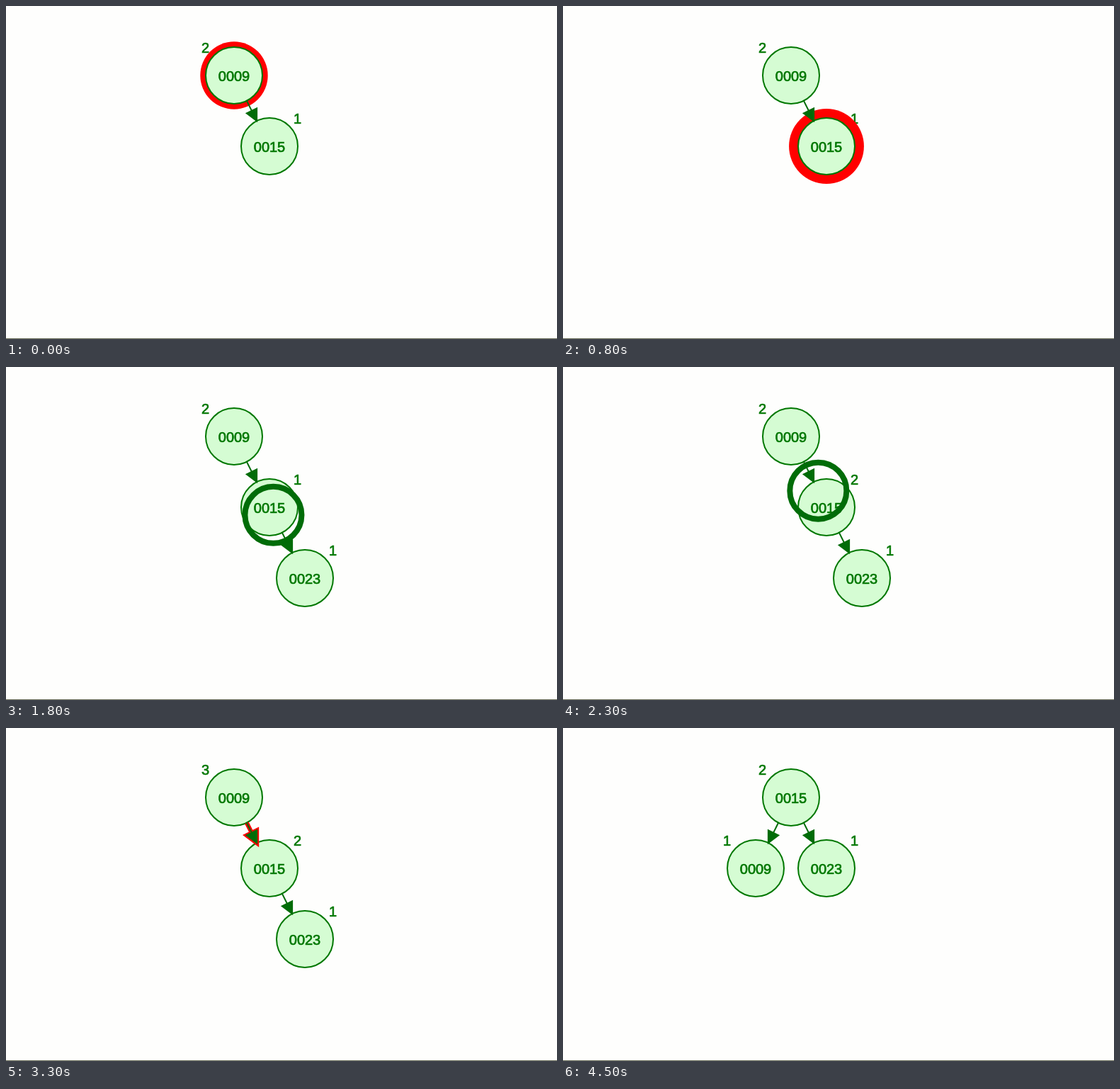
Recreate the animation shown at these times as an HTML page with a canvas. Size 778 by 470 pixels, loop 5000 ms.

```html
<!DOCTYPE html>
<html lang="en">
<head>
<meta charset="utf-8">
<title>Balanced tree insertion</title>
<style>
  html, body { margin: 0; width: 100%; height: 100%; overflow: hidden; background: #fefefd; }
  canvas { display: block; filter: blur(0.7px); }
  #rule { position: absolute; left: 0; top: 469px; width: 778px; height: 1px; background: #666a55; }
</style>
</head>
<body>
<canvas id="stage" width="778" height="470"></canvas>
<div id="rule"></div>
<script>
const ctx = document.getElementById('stage').getContext('2d');
const LOOP = 5000, TICK = 100;
const BLOCK = 372.5, FIRST = -22;   // every algorithm step lasts one block
const R = 40;
const PAPER = '#fefefd', FILL = '#d5fcd3', INK = '#007700', LINK = '#006c08', RED = '#ff0000';

const at = (x, y) => ({ x, y });
const mix = (a, b, p) => at(a.x + (b.x - a.x) * p, a.y + (b.y - a.y) * p);

// Resting places of nodes and of their height labels
const ROOT = at(322, 98), LEFT = at(272, 198), RIGHT = at(372, 198), DEEP = at(422, 298);
const ROOT_H = at(281.5, 59), LEFT_H = at(231.5, 159), RIGHT_H = at(411.5, 159), DEEP_H = at(461.5, 259);
const NEW_NODE = at(-618, 98), NEW_H = at(-518, 158);

// Highlight thickness swings between 3 and 7 units of 2 px
function pulse(t) {
  const u = (0.85 + t / 217) % 8;
  return 2 * (3 + 4 - Math.abs(u - 4));
}

function disc(c, r) {
  ctx.beginPath();
  ctx.arc(c.x, c.y, r, 0, Math.PI * 2);
}

function text(str, x, y, color) {
  ctx.fillStyle = ctx.strokeStyle = color;
  ctx.lineWidth = 0.7;
  ctx.fillText(str, x, y);
  ctx.strokeText(str, x, y);
}

function drawNode(n, glow) {
  if (glow) {
    disc(n.pos, R + glow);
    ctx.fillStyle = RED;
    ctx.fill();
  }
  disc(n.pos, R);
  ctx.fillStyle = FILL;
  ctx.fill();
  ctx.strokeStyle = INK;
  ctx.lineWidth = 2;
  ctx.stroke();
  text(n.key, n.pos.x, n.pos.y + 8, INK);
}

function drawArrow(a, b, width, color) {
  const d = Math.hypot(b.x - a.x, b.y - a.y);
  const tail = mix(a, b, R / d), tip = mix(b, a, R / d);
  const len = Math.hypot(tip.x - tail.x, tip.y - tail.y) || 1;
  const ux = (tip.x - tail.x) / len, uy = (tip.y - tail.y) / len;
  const bx = tip.x - ux * 16, by = tip.y - uy * 16;
  ctx.strokeStyle = ctx.fillStyle = color;
  ctx.lineWidth = width;
  ctx.beginPath();
  ctx.moveTo(tail.x, tail.y);
  ctx.lineTo(tip.x, tip.y);
  ctx.stroke();
  ctx.beginPath();
  ctx.moveTo(tip.x, tip.y);
  ctx.lineTo(bx - uy * 8, by + ux * 8);
  ctx.lineTo(bx + uy * 8, by - ux * 8);
  ctx.closePath();
  ctx.stroke();
  ctx.fill();
}

function drawRing(c) {
  disc(c, R);
  ctx.strokeStyle = LINK;
  ctx.lineWidth = 8;
  ctx.stroke();
}

// Steps: 0 visit 9, 1 descend, 2 visit 15, 3 insert 23, 4 ascend,
// 5 height of 15, 6 ascend, 7 height of 9, 8 mark edge, 9 rotate, 10+ rest
function draw(t) {
  const step = Math.floor((t - FIRST) / BLOCK);
  const p = (t - FIRST) / BLOCK - step;
  const done = n => step < n ? 0 : step > n ? 1 : p;
  const ins = done(3), rot = done(9);
  const spun = step >= 9;

  const n9 = {
    key: '0009', pos: mix(ROOT, LEFT, rot), hPos: mix(ROOT_H, LEFT_H, rot),
    h: spun ? 1 : step >= 7 ? 3 : 2, hot: step === 7
  };
  const n15 = {
    key: '0015', pos: mix(RIGHT, ROOT, rot), hPos: mix(RIGHT_H, ROOT_H, rot),
    h: step >= 5 ? 2 : 1, hot: step === 5
  };
  // The new node eases in while its label travels evenly
  const n23 = {
    key: '0023', h: 1,
    pos: spun ? mix(DEEP, RIGHT, rot) : mix(NEW_NODE, DEEP, 1 - (1 - ins) ** 2),
    hPos: spun ? mix(DEEP_H, RIGHT_H, rot) : mix(NEW_H, DEEP_H, ins)
  };
  const nodes = step >= 3 ? [n9, n15, n23] : [n9, n15];
  const lit = step === 0 ? n9 : step === 2 ? n15 : null;

  ctx.fillStyle = PAPER;
  ctx.fillRect(0, 0, 778, 470);

  for (const n of nodes) if (n !== lit) drawNode(n, 0);
  for (const n of nodes) text(n.h, n.hPos.x, n.hPos.y + 7, n.hot ? RED : INK);
  if (lit) drawNode(lit, pulse(t));

  if (step === 1) drawRing(mix(ROOT, RIGHT, p));
  if (step === 4) drawRing(mix(DEEP, RIGHT, p));
  if (step === 6) drawRing(mix(RIGHT, ROOT, p));

  const [top, low] = spun ? [n15, n9] : [n9, n15];
  if (step === 8) drawArrow(top.pos, low.pos, pulse(t), RED);
  drawArrow(top.pos, low.pos, 2, LINK);
  if (step >= 3) drawArrow(n15.pos, n23.pos, 2, LINK);
}

ctx.font = '20px "Liberation Sans", Arial, sans-serif';
ctx.textAlign = 'center';

const start = performance.now();
function frame() {
  const t = (performance.now() - start) % LOOP;
  draw(Math.floor(t / TICK) * TICK);
  requestAnimationFrame(frame);
}
frame();
</script>
</body>
</html>
```
